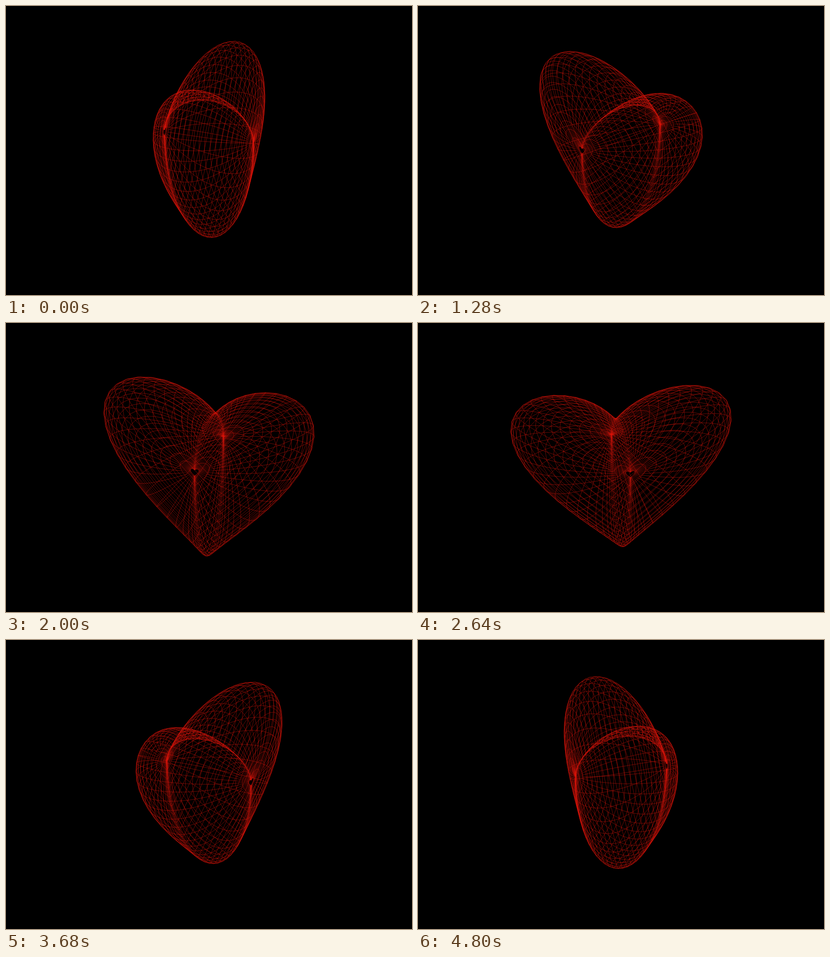
These frames come from a looping animation (886 px wide and 632 px high, 4.88 s). An HTML page with a canvas:

```html
<!DOCTYPE html>
<html lang="en">
<head>
<meta charset="utf-8">
<title>Beating wireframe heart</title>
<style>
  html, body { margin: 0; width: 100%; height: 100%; overflow: hidden; background: #000; }
  canvas { display: block; }
</style>
</head>
<body>
<canvas id="stage" width="886" height="632"></canvas>
<script>
const ctx = document.getElementById('stage').getContext('2d');
const { sin, cos, PI } = Math;

const STEP_MS = 80, STEPS = 61;
const CENTER = { x: 443, y: 286.8 };
const SCALE = 12.7;
const TILT_SIN = 0.395, TILT_COS = 0.919;
const RINGS = 32, SPOKES = 63, STEP = 0.1;

// Screen position of a surface point; u runs pole to pole, v around the heart.
function makeProjector(turn, beat) {
  const turnSin = sin(turn), turnCos = cos(turn);
  const wide = 15.3 - 0.5 * beat;
  const deep = 8.75 - 0.8 * beat;
  const tall = 0.943 + 0.06 * beat;
  const lobe = 13.7 + 1.3 * beat;
  return (u, v) => {
    const x = sin(u) * (wide * sin(v) - 4 * sin(3 * v));
    const y = -deep * cos(u);
    const z = tall * sin(u) * (lobe * cos(v) - 6 * cos(2 * v) - 2 * cos(3 * v));
    const across = x * turnCos + y * turnSin;
    const toward = y * turnCos - x * turnSin;
    return [
      CENTER.x + SCALE * across,
      CENTER.y + SCALE * (toward * TILT_SIN - z * TILT_COS)
    ];
  };
}

function strokeCurve(count, pointAt) {
  ctx.beginPath();
  for (let i = 0; i < count; i++) ctx.lineTo(...pointAt(i * STEP));
  ctx.stroke();
}

function draw(step) {
  const turn = (-108 + 3.6 * step) * PI / 180;
  const beat = cos((step + 1) / 4) ** 4;
  const project = makeProjector(turn, beat);

  ctx.fillStyle = '#000';
  ctx.fillRect(0, 0, 886, 632);
  ctx.strokeStyle = '#dc140a';
  ctx.lineWidth = 0.5;
  ctx.lineJoin = 'round';
  for (let i = 1; i < RINGS; i++) strokeCurve(SPOKES + 1, v => project(i * STEP, v));
  for (let j = 0; j < SPOKES; j++) strokeCurve(RINGS, u => project(u, j * STEP));
}

const start = performance.now();
function tick() {
  const elapsed = performance.now() - start;
  draw(Math.floor(elapsed / STEP_MS) % STEPS);
  requestAnimationFrame(tick);
}
tick();
</script>
</body>
</html>
```
